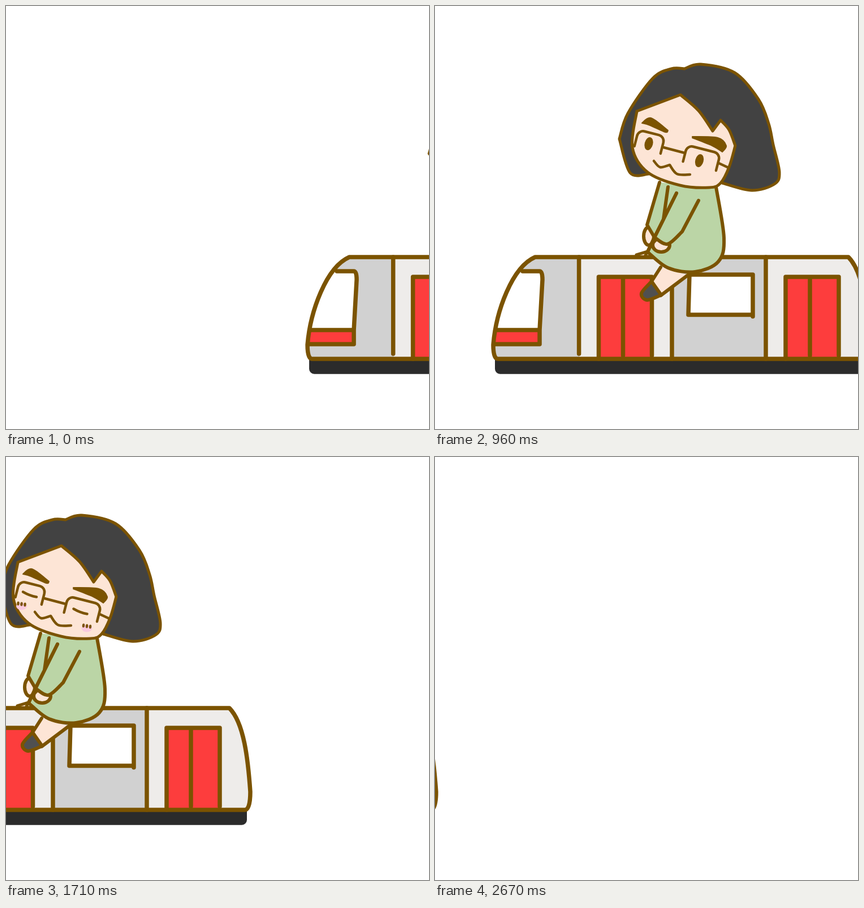
These frames come from a looping animation (748x748 px, 2.7 s). An HTML page with a canvas:

```html
<!DOCTYPE html>
<html lang="en">
<head>
<meta charset="utf-8">
<title>Train ride</title>
<style>
html, body { margin: 0; width: 100%; height: 100%; overflow: hidden; background: #fff; }
canvas { display: block; }
</style>
</head>
<body>
<canvas id="stage" width="748" height="748"></canvas>
<script>
const ctx = document.getElementById('stage').getContext('2d');
const FRAME = 30, FRAMES = 90, STEP = 13.44, HOLD = 18, CENTER_FRAME = 32;
const BROWN = '#7b5300', GRAY = '#d1d1d1', LIGHT = '#eeecea', RED = '#fd3d3d';
const HAIR = '#424242', SKIN = '#fde5d6', GREEN = '#bbd5a6', PINK = '#f9cade';
const TRAIN_LINE = 7.5, BODY_LINE = 6, HAIR_LINE = 5, FACE_LINE = 4.5;
const ROOF = 444, FLOOR = 624, TILT = 0.25;

// Smooth curve through "x,y" points; "|" makes the previous point a corner.
function curve(text) {
  const path = new Path2D();
  let last = null;
  for (const part of text.split('|')) {
    const pts = part.trim().split(/\s+/).map(p => p.split(',').map(Number));
    if (last) pts.unshift(last);
    else path.moveTo(...pts[0]);
    for (let i = 0; i < pts.length - 1; i++) {
      const b = pts[i], c = pts[i + 1], a = pts[i - 1] || b, d = pts[i + 2] || c;
      path.bezierCurveTo(
        b[0] + (c[0] - a[0]) / 6, b[1] + (c[1] - a[1]) / 6,
        c[0] - (d[0] - b[0]) / 6, c[1] - (d[1] - b[1]) / 6, c[0], c[1]);
    }
    last = pts[pts.length - 1];
  }
  return path;
}

function ellipse(x, y, rx, ry, tilt = 0) {
  const path = new Path2D();
  path.ellipse(x, y, rx, ry, tilt, 0, Math.PI * 2);
  return path;
}

function fill(path, color) {
  ctx.fillStyle = color;
  ctx.fill(path);
}

function stroke(path, width) {
  ctx.strokeStyle = BROWN;
  ctx.lineWidth = width;
  ctx.stroke(path);
}

function shape(path, color, width) {
  fill(path, color);
  stroke(path, width);
}

function box(x, y, w, h, color) {
  ctx.fillStyle = color;
  ctx.fillRect(x, y, w, h);
}

function at(x, y, tilt, paint) {
  ctx.save();
  ctx.translate(x, y);
  ctx.rotate(tilt);
  paint();
  ctx.restore();
}

const shell = new Path2D(`M177 ${ROOF}H731C757 470 764 535 768 592Q768 ${FLOOR} 758 ${FLOOR}H111Q103 ${FLOOR} 103 599C108 540 136 462 177 ${ROOF}Z`);
const frontGlass = new Path2D('M90 469H190L185 573H90Z');
const frontLines = new Path2D('M155 469H185Q190 469 190 484L185 573V598H104M108 573H185');
const sideWindow = new Path2D('M562 549V475H450L448 546H562');
const doorLines = new Path2D('M0 145V0H94V139M43 0V139');
const panels = [95, 254.6, 419, 585, 775];

const dress = curve('397,312 | 375,387 | 388,409 | 376,435 | 412,463 460,470 501,452 511,410 497,320');
const sleeve = curve('427,331 | 388,409 | 411,421 437,399 | 466,344');
const folds = curve('427,331 | 376,434 | 427,331 | 412,320 | 404,377');
const armLine = new Path2D('M427 331L376 434M412 320L404 377');
const leg = curve('399,462 | 383,487 | 399,512 | 447,476');
const shoe = curve('383,487 | 365,508 375,520 400,511 | 383,487');
const backFoot = curve('356,440 | 376,434 | 372,441');

const face = curve('357,186 | 434,157 | 466,185 491,221 | 505,202 | 520,219 531,247 | 520,285 505,313 485,321 433,317 376,294 349,250 357,186');
const leftBrow = curve('366,207 382,198 412,220 | 407,223 380,211 366,207');
const rightBrow = curve('455,231 | 500,233 515,247 508,258 | 490,247 455,233');
const mouth = curve('387,274 398,285 415,281 | 428,297 451,298');
const shutEye = new Path2D('M-12 -5Q0 2 12 4');

// The crown stays still; only the ends of the hair move in the wind.
const hair = (left, right) => curve(
  `${left} | 341,190 385,128 418,111 441,111 | 470,103 530,118 572,165 590,208 ${right}`);
const hanging = hair('393,306 350,294 318,261', '598,265 595,331 | 550,325 508,315');
const lifted = hair('378,297 345,295 326,235', '598,245 609,294 600,315 560,326 508,313');
const blown = hair('356,275 341,263 323,246', '597,250 610,290 633,317 | 570,327 508,313');
const poses = [hanging, lifted, blown, lifted, hanging];

function drawDoor(x) {
  at(x, 479, 0, () => {
    box(0, 0, 94, 145, RED);
    stroke(doorLines, TRAIN_LINE);
  });
}

function drawTrain() {
  const base = new Path2D();
  base.roundRect(106, 615, 656, 35.7, 9);
  fill(base, '#2b2b2b');

  ctx.save();
  ctx.clip(shell);
  for (let i = 0; i < panels.length - 1; i++) {
    box(panels[i], ROOF, panels[i + 1] - panels[i], FLOOR - ROOF, i % 2 ? LIGHT : GRAY);
  }
  fill(frontGlass, '#fff');
  box(95, 573, 90, 25, RED);
  ctx.restore();

  [289.5, 620].forEach(drawDoor);
  shape(sideWindow, '#fff', TRAIN_LINE);
  stroke(frontLines, TRAIN_LINE);
  panels.slice(1, -1).forEach((x, i) =>
    stroke(new Path2D(`M${x} ${ROOF}V${i ? FLOOR : 615}`), TRAIN_LINE));
  stroke(shell, TRAIN_LINE);
}

function drawBody() {
  shape(backFoot, SKIN, HAIR_LINE);
  shape(leg, SKIN, BODY_LINE);
  shape(shoe, '#505050', BODY_LINE);
  shape(ellipse(378, 407, 9, 16), SKIN, BODY_LINE);
  shape(dress, GREEN, BODY_LINE);
  shape(ellipse(400, 423, 15, 12), SKIN, BODY_LINE);
  shape(sleeve, GREEN, BODY_LINE);
  stroke(armLine, BODY_LINE);
}

function drawLens(x, y, width) {
  const path = new Path2D();
  path.moveTo(0, 30);
  path.arcTo(0, 0, width, 0, 11);
  path.arcTo(width, 0, width, 30, 11);
  path.lineTo(width, 31);
  at(x, y, TILT, () => stroke(path, FACE_LINE));
}

function drawBlush(x, y) {
  fill(ellipse(x, y + 4, 9.5, 6.5), PINK);
  for (const i of [-1, 0, 1]) fill(ellipse(x + i * 6, y + i, 2.2, 3.6, 0.1), BROWN);
}

function drawHead(hairShape, asleep) {
  shape(hairShape, HAIR, HAIR_LINE);
  shape(face, SKIN, HAIR_LINE);
  for (const brow of [leftBrow, rightBrow]) shape(brow, BROWN, 2);
  for (const side of [0, 1]) {
    const x = 378 + side * 89.5, y = 243.5 + side * 30;
    if (asleep) {
      at(x, y, 0, () => stroke(shutEye, FACE_LINE));
      drawBlush(363.5 + side * 115.5, 260 + side * 39);
    } else {
      fill(ellipse(x, y, 7.3, 11.6, TILT), BROWN);
    }
  }
  drawLens(360, 219, 48);
  drawLens(446, 246, 60.5);
  stroke(new Path2D('M404 250L442 260M502 278L517 285'), FACE_LINE);
  stroke(mouth, FACE_LINE);
}

function draw(frame) {
  const pose = Math.floor(frame / HOLD);
  ctx.setTransform(1, 0, 0, 1, 0, 0);
  box(0, 0, 748, 748, '#fff');
  ctx.translate((CENTER_FRAME - frame) * STEP, 0);
  ctx.lineCap = ctx.lineJoin = 'round';
  drawTrain();
  drawBody();
  drawHead(poses[pose], pose >= 2);
}

const start = performance.now();
function tick() {
  draw(Math.floor((performance.now() - start) / FRAME) % FRAMES);
  requestAnimationFrame(tick);
}
tick();
</script>
</body>
</html>
```
